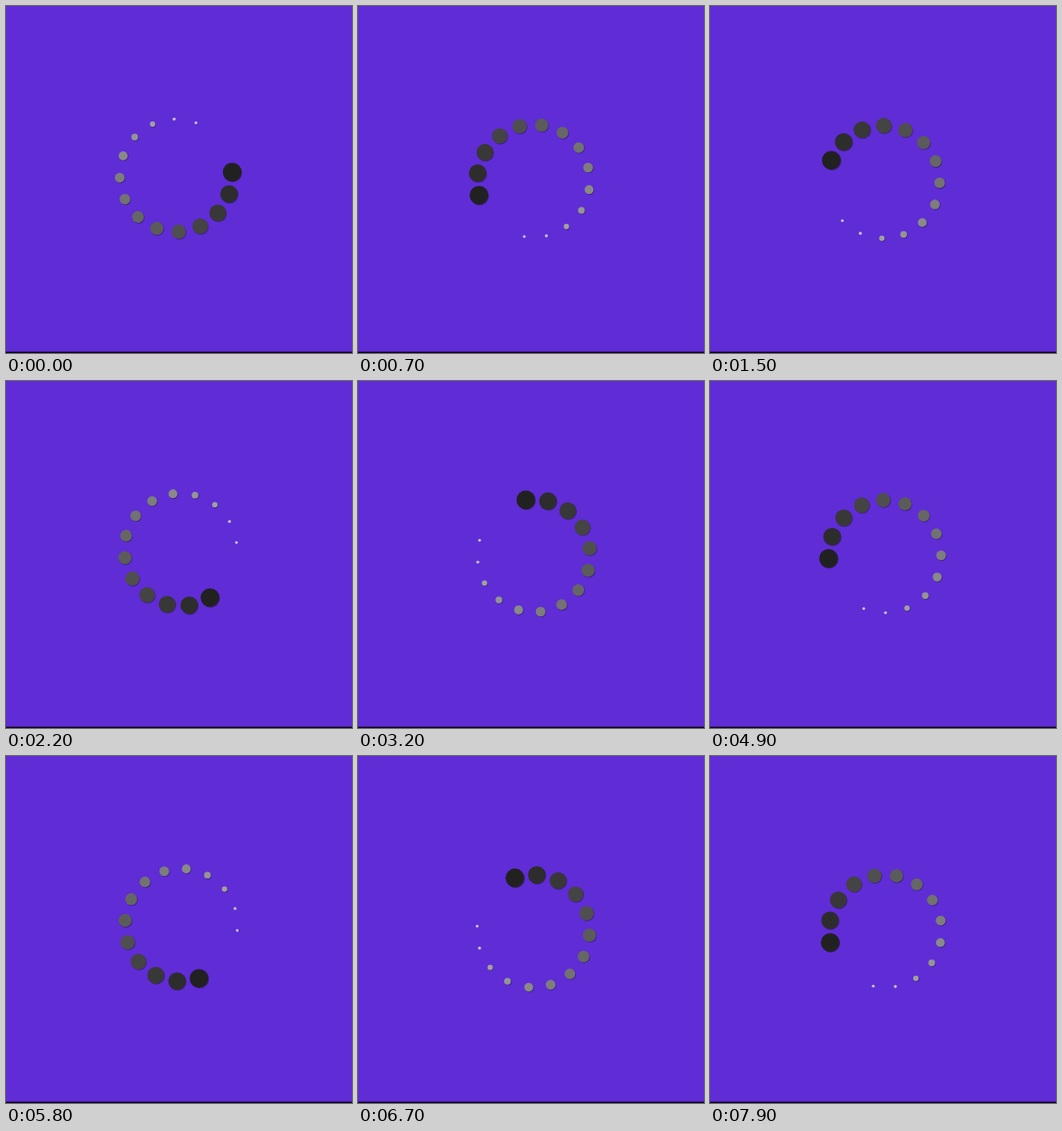
Recreate the animation shown at these times as an HTML page with a canvas. Size 381 by 382 pixels, loop 8 s.

```html
<!DOCTYPE html>
<html lang="en">
<head>
<meta charset="utf-8">
<title>Dot spinner</title>
<style>
  html, body { margin: 0; width: 100%; height: 100%; overflow: hidden; background: #602cd6; }
  canvas { display: block; width: 381px; height: 382px; }
</style>
</head>
<body>
<canvas id="stage" width="381" height="382"></canvas>
<script>
const ctx = document.getElementById('stage').getContext('2d');
const LOOP = 8000, STEP = 100, CYCLE = 3540;
const PIVOT = { x: 190.3, y: 189.4 }, SWAY = 4.3;
const RING = 62, GAP = 22.62;
const RADII = [10.3, 9.7, 9.3, 8.6, 7.9, 7.3, 6.5, 5.9, 5.4, 4.9, 3.7, 3, 1.7, 1.5];

// Time in the cycle, angle of the leading dot, angle of the ring's sway (degrees)
const KEYS = [
  [0, -3.3, 223],
  [700, 165.3, 408],
  [820, 168.3, 410],
  [1360, 177.9, 419],
  [1860, 335, 573],
  [2200, 418.6, 658],
  [3160, 611, 772],
  [3200, 622, 762],
  [3540, 716.7, 943]
];

const rad = deg => deg * Math.PI / 180;

function slope(i, col) {
  const last = KEYS.length - 1;
  const chord = j => {
    const k = (j + last) % last;
    return (KEYS[k + 1][col] - KEYS[k][col]) / (KEYS[k + 1][0] - KEYS[k][0]);
  };
  const a = chord(i - 1), b = chord(i);
  return a * b > 0 ? 2 * a * b / (a + b) : 0;
}

// Smooth interpolation without overshoot
function sample(p, col) {
  let i = 0;
  while (p >= KEYS[i + 1][0]) i++;
  const a = KEYS[i], b = KEYS[i + 1];
  const h = b[0] - a[0], u = (p - a[0]) / h, v = 1 - u;
  return a[col] * (1 + 2 * u) * v * v + b[col] * (1 + 2 * v) * u * u
    + h * u * v * (slope(i, col) * v - slope(i + 1, col) * u);
}

function disc(x, y, r, fill) {
  ctx.fillStyle = fill;
  ctx.beginPath();
  ctx.arc(x, y, r, 0, 2 * Math.PI);
  ctx.fill();
}

function draw(t) {
  const p = t % CYCLE;
  const head = sample(p, 1), sway = rad(sample(p, 2));
  const cx = PIVOT.x + SWAY * Math.cos(sway);
  const cy = PIVOT.y + SWAY * Math.sin(sway);

  ctx.fillStyle = '#602cd6';
  ctx.fillRect(0, 0, 381, 382);
  ctx.fillStyle = '#0b0518';
  ctx.fillRect(0, 380.6, 381, 1.4);

  RADII.forEach((r, i) => {
    const a = rad(head + i * GAP);
    const x = cx + RING * Math.cos(a), y = cy + RING * Math.sin(a);
    const grey = Math.round(33 + 11.5 * i + (i > 11 ? 20 : 0));
    if (r > 2) disc(x + 0.7, y + 0.8, r, 'rgba(40, 28, 70, 0.6)');
    disc(x, y, r, `rgb(${grey}, ${grey}, ${grey})`);
  });
}

function tick(now) {
  const t = now % LOOP;
  draw(Math.floor(t / STEP) * STEP);
  requestAnimationFrame(tick);
}

draw(0);
requestAnimationFrame(tick);
</script>
</body>
</html>
```
